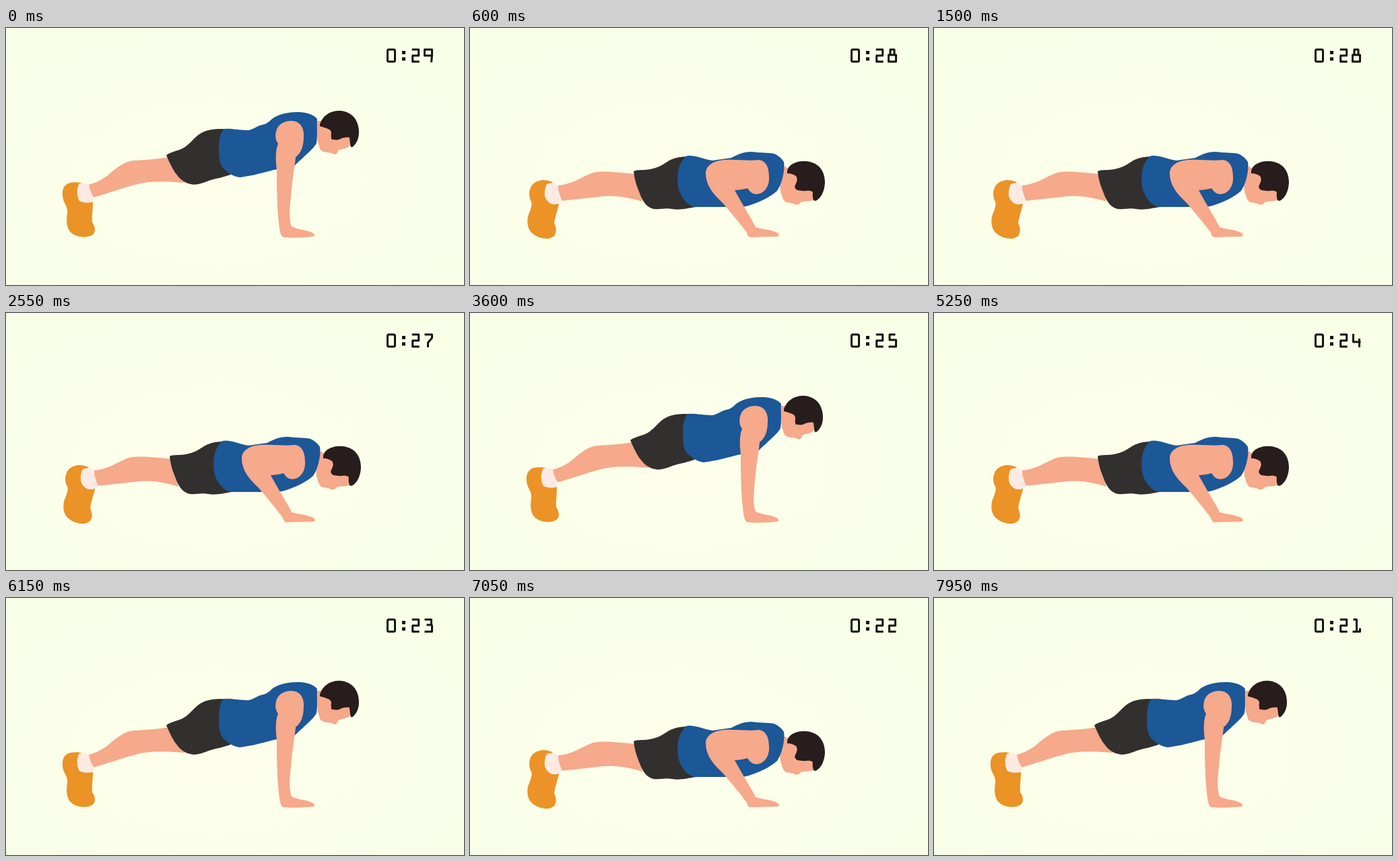
Write an HTML page that moves like this. It is 680 px wide and 382 px high and loops after 8000 ms.

```html
<!DOCTYPE html>
<html lang="en">
<head>
<meta charset="utf-8">
<title>Push-ups</title>
<style>
  html, body { margin: 0; width: 100%; height: 100%; overflow: hidden; background: #fafee8; }
  svg { display: block; width: 100vw; height: 100vh; }
  .skin { fill: #f6a98b; }
  .sock { fill: #fdebe3; }
  .shoe { fill: #eb9326; }
  .shorts { fill: #32302e; }
  .shirt { fill: #1c5797; }
  .hair { fill: #271d1c; }
  #timer { fill: none; stroke: #14120f; stroke-width: 3; stroke-linejoin: round; }
</style>
</head>
<body>
<svg id="stage" viewBox="0 0 680 382" xmlns="http://www.w3.org/2000/svg">
  <defs>
    <radialGradient id="glow" cx="46%" cy="60%" r="68%">
      <stop offset="0" stop-color="#fdffeb"/>
      <stop offset=".6" stop-color="#fbffe9"/>
      <stop offset="1" stop-color="#f7ffe6"/>
    </radialGradient>
  </defs>
  <rect width="680" height="382" fill="url(#glow)"/>
  <g id="up"></g>
  <g id="down"></g>
  <g id="timer" role="timer">
    <path id="minutes" transform="translate(566.5 32)"/>
    <path d="M588 34h5v5h-5zM588 43.5h5v5h-5z" fill="#14120f" stroke="none"/>
    <path id="tens" transform="translate(602.7 32)"/>
    <path id="ones" transform="translate(621.5 32)"/>
  </g>
</svg>
<script>
const LOOP = 8000, BEAT = 1000;
const POSE_OFFSET = 540, TICK_OFFSET = 575, START_SECONDS = 29;

// Each pose lists its layers from back to front.
const poses = {
  up: [
    ['skin', 'M122 233Q136 230 150 220C165 207 176 198 190 197Q215 196 245 192L266 230C240 228 215 227 195 232C170 238 150 247 128 252Z'],
    ['shoe', 'M84 248C83 238 88 230 99 229.5Q108 229 112 230L129 258C129 270 127 281 128 289C132 294 134 302 129 307C122 312 108 312 99 306C90 300 89 288 91 274C92 264 84 260 84 248Z'],
    ['sock', 'M109 231Q117 229 123 233Q125 244 130 251Q132 257 128 259Q116 261 109 257C104 248 105 237 109 231Z'],
    ['shorts', 'M238 189C246 183 258 183 267 176C276 169 281 161 290 156C301 150 312 150 326 150L335 217C325 222 312 223 301 227C291 231 282 234 274 232C256 228 247 210 238 189Z'],
    ['skin', 'M460 138L468 138L486 143V158L512 163C511 172 511 176 508 177C502 180 496 180 493 182C492 187 489 189 486 187C480 184 475 186 470 183C465 182 466 175 463 170Z'],
    ['shirt', 'M323 150C335 149 345 152 359 152C368 151 372 145 384 143C392 140 394 134 402 131C412 126 424 125 436 125C450 126 458 130 462 135C461 145 463 160 461 171C458 178 448 186 428 205L402 210C385 214 365 220 347 222C337 221 328 214 322 208C318 203 316 195 316 180C316 165 318 156 323 150Z'],
    ['skin', 'M404 172C399 165 400 158 401 154C403 144 412 138 424 138C436 138 443 148 442 161C442 176 438 186 430 192C429 205 425 225 423 250C421 270 420 285 424 295C432 300 445 299 456 305Q460 308 456 310C440 312 425 312 412 311C406 309 406 295 404 280C402 250 402 230 402 210C400 195 400 182 404 172Z'],
    ['hair', 'M466 143C470 130 482 122 497 123C515 125 524 138 524 155C524 166 519 174 514 177Q511 178 511 172L510 163C505 162 500 163 496 165C490 168 487 165 484 166Q482 164 483 156C483 150 476 149 466 146Z']
  ],
  down: [
    ['skin', 'M130 234C150 233 165 222 180 216C195 211 220 215 246 217L256 258C230 250 210 248 190 251C170 253 150 256 132 257Z'],
    ['shoe', 'M88 247C88 234 96 227 108 226Q116 226 122 229L132 262C130 270 126 282 125 290C128 296 129 304 125 309C118 315 108 314 98 309C86 303 84 292 86 280C90 270 93 262 91 258Q88 253 88 247Z'],
    ['sock', 'M114 232Q123 228 131 234Q131 245 137 257Q133 263 122 262Q113 258 111 250Q110 239 114 232Z'],
    ['shorts', 'M243 213Q245 211 258 211C275 210 284 205 294 198C304 192 314 191 326 191L336 266C322 268 312 271 300 269C290 267 283 270 273 269C262 267 256 257 252 246C247 234 244 224 243 213Z'],
    ['skin', 'M456 200L473 209L489 216V236L509 241L510 256C504 258 496 257 491 259C489 263 485 263 482 262C478 259 474 261 470 259C464 257 464 250 461 243Z'],
    ['shirt', 'M322 190C333 188 347 195 360 197L388 193C395 189 405 184 418 184C432 186 445 185 452 187Q461 191 466 199C468 212 463 232 456 242C445 252 425 262 405 266L336 266Q333 266 330 265C315 258 308 242 308 224C308 210 313 196 322 190Z'],
    ['skin', 'M350 216C350 204 362 197 378 196C395 195 415 198 428 196C440 197 444 208 444 221C445 236 436 247 425 247C418 247 414 241 412 238C406 240 398 241 393 241C403 260 415 278 424 296C435 300 448 299 457 305Q461 308 457 310L416 311Q412 310 411 304C401 291 388 275 376 261C364 249 350 236 350 216Z'],
    ['hair', 'M471 213C472 203 485 197 498 198C517 199 527 212 527 230C526 244 521 253 513 257L510 256Q508 250 509 244C504 240 498 243 494 242C487 241 484 242 482 236C484 230 488 226 484 220Q478 216 471 216Z']
  ]
};

const digits = [
  'M2 0H9Q11 0 11 2V16Q11 18 9 18H2Q0 18 0 16V2Q0 0 2 0Z',
  'M1 0H6V18M0 18H11V13',
  'M0 0H10V9H1V18H11',
  'M0 0H10V8H3M10 8Q11 8 11 10V18H0',
  'M1 -1V11H12M10 6V19',
  'M10 0H1.5V8H11V18H0',
  'M1 -1V18H11V9H1',
  'M0 0H11V5L5 12V19',
  'M2.5 0H8.5V8H2.5ZM0 8H11V18H0Z',
  'M11 9H0V0H11V9L10 19'
];

const byId = id => document.getElementById(id);
const showDigit = (id, value) => byId(id).setAttribute('d', digits[value]);
const beatsSince = (time, offset) => Math.floor((time - offset) / BEAT) + 1;

function buildPose(id) {
  for (const [part, d] of poses[id]) {
    const path = document.createElementNS('http://www.w3.org/2000/svg', 'path');
    path.setAttribute('class', part);
    path.setAttribute('d', d);
    byId(id).append(path);
  }
}

function render(time) {
  const isDown = beatsSince(time, POSE_OFFSET) % 2 === 1;
  byId('up').style.display = isDown ? 'none' : '';
  byId('down').style.display = isDown ? '' : 'none';

  const seconds = START_SECONDS - beatsSince(time, TICK_OFFSET);
  showDigit('minutes', 0);
  showDigit('tens', Math.floor(seconds / 10));
  showDigit('ones', seconds % 10);
  byId('timer').setAttribute('aria-label', `0:${seconds}`);
}

Object.keys(poses).forEach(buildPose);
const start = performance.now();
function loop() {
  render((performance.now() - start) % LOOP);
  requestAnimationFrame(loop);
}
loop();
</script>
</body>
</html>
```
